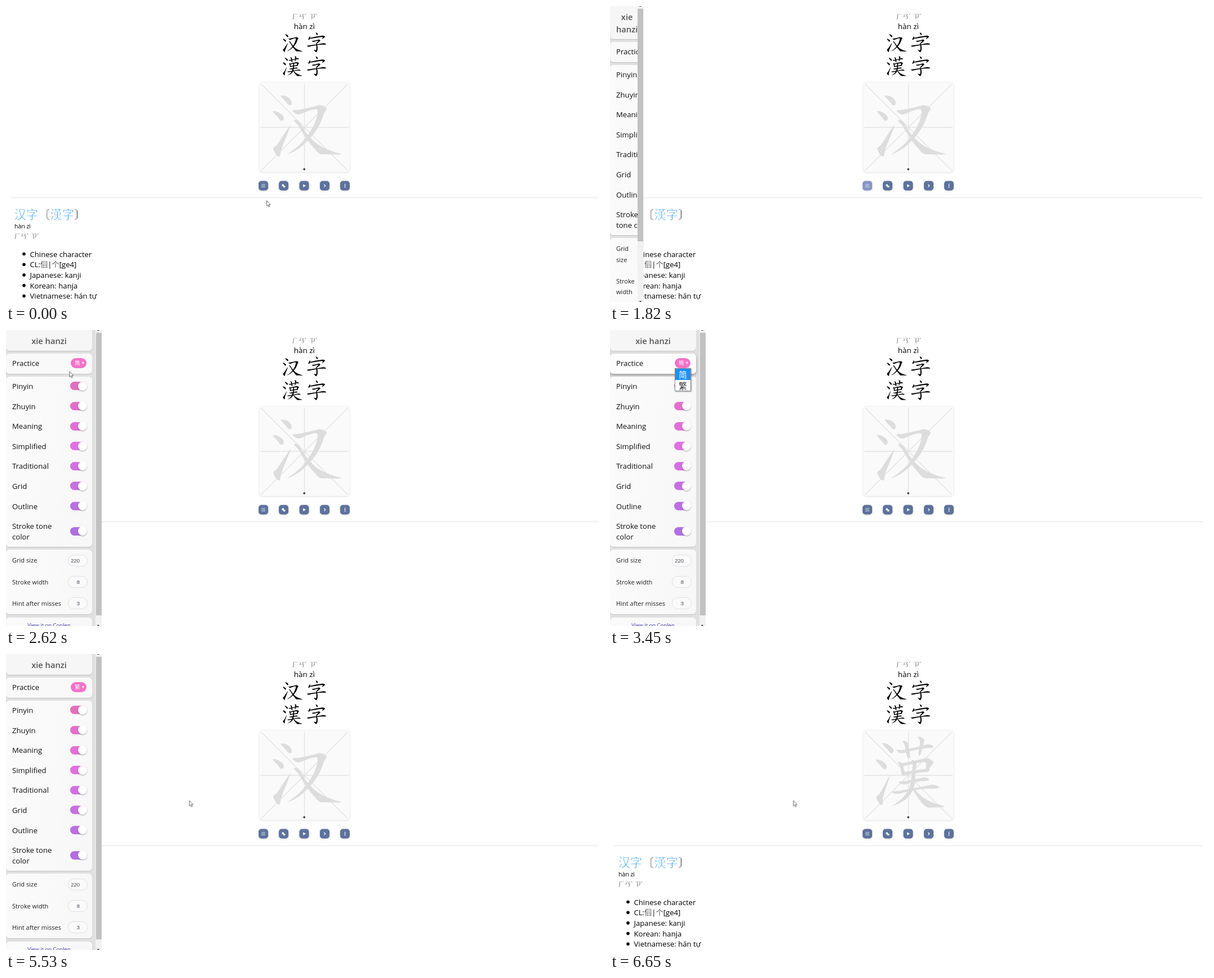
Recreate the animation shown at these times as an HTML page. Size 1063 by 527 pixels, loop 8 s.

```html
<!DOCTYPE html>
<html lang="zh">
<head>
<meta charset="utf-8">
<title>xie hanzi</title>
<style>
html, body { margin: 0; width: 100%; height: 100%; overflow: hidden; background: #fff; }
body { position: relative; font: 13.15px/18.7px "Open Sans", "Noto Sans", "Noto Sans CJK SC", sans-serif; color: #111; }
svg { position: absolute; left: 0; top: 0; display: block; }
.zhuyin { font: 11px "Noto Sans", "Noto Sans CJK TC", sans-serif; }
.entry { font: 21.3px "Noto Sans CJK SC", sans-serif; }
/* a white outline thins the strokes */
.thin { stroke: #fff; stroke-width: .35px; }
.entry.thin { stroke-width: .8px; }

.simplified, .traditional, .press, .popup, .option, .pick, .cursor, .cursor path, .thumb, .sidebar, .practice {
  animation: 8s step-end infinite;
}

/* writing pad and toolbar */
.simplified { animation-name: first-glyph; }
.traditional { animation-name: second-glyph; }
.press { animation-name: press; }
@keyframes first-glyph { 0% { opacity: 1 } 83.125%, to { opacity: 0 } }
@keyframes second-glyph { 0% { opacity: 0 } 83.125%, to { opacity: 1 } }
@keyframes press {
  0% { fill: #5d729c } 15% { fill: #7183b2 } 18.625% { fill: #8796c4 }
  26.5%, to { fill: #5d729c }
}

/* sidebar */
.sidebar {
  position: absolute; left: 0; top: 0; width: 0; height: 527px; overflow: hidden;
  background: #e0e0e0; animation-name: slide; animation-timing-function: ease;
}
@keyframes slide {
  0%, 21.36% { width: 0 }
  27.61%, 70.025% { width: 170px }
  76.28%, to { width: 0 }
}
.view { position: absolute; left: 0; right: 11px; top: 0; bottom: 0; overflow: hidden; }
.content { width: calc(100% - 6px); min-width: 60px; }
.panel {
  box-sizing: border-box; min-width: min-content; margin-bottom: 5px; padding: 0 10px 0 11px; border-radius: 6px;
  background: linear-gradient(100deg, #fbfbfb, #f7f7f7); box-shadow: 0 1px 1px #0002;
}
.title {
  padding: 7.5px 11px; border-radius: 0 0 6px 6px; text-align: center; background: #f6f6f6;
  font-size: 14.7px; font-weight: 600; line-height: 22px; color: #555;
}
.practice { display: flex; justify-content: space-between; align-items: center; height: 35.6px; animation-name: raise; animation-timing-function: ease; }
@keyframes raise {
  0%, 41.25% { background: #f9f9f9; box-shadow: 0 1px 1px #0002 }
  45.5%, 66.625% { background: #fff; box-shadow: 0 3px 7px #0006 }
  69.125%, to { background: #f9f9f9; box-shadow: 0 1px 1px #0002 }
}
.select {
  position: relative; flex: none; width: 28px; height: 18px; margin: -2px 0 0 12px; border-radius: 9px;
  background: #f373c9; color: #fff; font: 9.5px/18px "Noto Sans CJK SC", sans-serif;
}
.select::after {
  content: ""; position: absolute; left: 19.5px; top: 7.5px;
  border: 2.3px solid transparent; border-top: 4px solid #fff; border-bottom: 0;
}
.pick { position: absolute; left: 7px; top: -.5px; }
.before { animation-name: before; }
.after { animation-name: after; }
@keyframes before { 0% { opacity: 1 } 58%, to { opacity: 0 } }
@keyframes after { 0% { opacity: 0 } 58%, to { opacity: 1 } }

.toggles, .numbers { display: grid; grid-template-columns: 1fr auto; align-items: center; }
.toggles { column-gap: 12px; }
.toggles span { padding: 8.45px 0; }
.toggles i {
  position: relative; width: 29px; height: 15px; margin-top: -1px; border-radius: 8px;
  background: hsl(calc(319 - var(--i) * 6.5) 66% 66%);
}
.toggles i::after {
  content: ""; position: absolute; right: -.5px; top: -.5px; width: 16px; height: 16px;
  border-radius: 50%; background: #fff; box-shadow: 0 1px 2px #0005;
}
.numbers { column-gap: 7px; padding-right: 8px; font-size: 11.05px; line-height: 19.2px; color: #222; }
.numbers span { padding: 9.5px 0; }
.numbers b {
  box-sizing: border-box; width: 35px; height: 21px; padding-right: 13px; border: 1px solid #e0e0e4; border-radius: 10px;
  background: #fafafa; text-align: right; font: 9.5px/19px "Liberation Sans", Arial, sans-serif; color: #445;
}
.link { height: 60px; margin-top: 6px; padding: 5px 0; text-align: center; white-space: nowrap; font-size: 9.5px; color: #3a35a5; }
.bar { position: absolute; right: 0; top: 0; width: 11px; height: 100%; background: #f1f1f1; }
.bar::before, .bar::after {
  content: ""; position: absolute; left: 3px; border: 2.5px solid transparent;
}
.bar::before { top: -3px; border-bottom: 4px solid #555; border-top: 0; }
.bar::after { bottom: -2px; border-top: 4px solid #555; border-bottom: 0; }
.thumb { position: absolute; left: .5px; top: 5px; width: 10px; height: 414px; background: #c1c1c1; animation-name: thumb; }
@keyframes thumb {
  0% { height: 414px } 23.2% { height: 422px } 24.8% { height: 503px }
  71% { height: 422px } 72.8%, to { height: 414px }
}

/* drop-down list */
.popup {
  position: absolute; left: 115px; top: 68px; box-sizing: border-box; width: 29px; height: 41px;
  border: 1px solid #8a8a8a; background: #fff; box-shadow: 1px 1px 2px #0005; animation-name: popup;
}
.option { height: 19.5px; text-align: center; font: 14.5px/19px "Noto Sans CJK SC", sans-serif; }
.option:first-child { animation-name: leave; }
.option:last-child { animation-name: enter; }
@keyframes popup { 0% { visibility: hidden } 41.25% { visibility: visible } 58%, to { visibility: hidden } }
@keyframes leave { 0% { background: #1e90ff; color: #fff } 50.5%, to { background: #fff; color: #333 } }
@keyframes enter { 0% { background: #fff; color: #333 } 50.5%, to { background: #1e90ff; color: #fff } }

/* pointer */
.cursor { animation-name: move; animation-timing-function: ease-in-out; }
.cursor path { animation-name: show; }
@keyframes move {
  0%, 9.125% { transform: translate(463px, 346px) }
  12.5% { transform: translate(441px, 333px) }
  16.125% { transform: translate(454px, 317px); animation-timing-function: step-end }
  29.375%, 31.25% { transform: translate(54px, 101px) }
  32.75% { transform: translate(112.5px, 73.5px) }
  38% { transform: translate(127px, 63px) }
  48.75% { transform: translate(128px, 66px) }
  52.25%, 58% { transform: translate(130px, 97px) }
  63.125%, to { transform: translate(325.5px, 260.5px) }
}
@keyframes show {
  0% { opacity: 1 } 15% { opacity: 0 } 29.375% { opacity: 1 }
  38% { opacity: 0 } 48.75%, to { opacity: 1 }
}
</style>
</head>
<body>
<svg width="1063" height="527">
  <defs>
    <filter id="soft" x="-20%" y="-20%" width="140%" height="140%"><feDropShadow dx="0" dy=".5" stdDeviation="1.5" flood-opacity=".2"/></filter>
    <g id="han-simple">
      <path d="M488 160C495 158 507 163 508 172C509 177 504 178 501 175C497 169 492 166 488 160Z
        M474 187C482 186 493 193 494 199C494 205 489 206 486 202C483 196 477 193 474 187Z
        M506 211C503 224 492 246 489 257C487 264 488 268 485 268C481 268 476 258 475 254C476 250 480 250 482 247C489 236 498 222 506 211Z"/>
      <path d="M509 187C512 184 516 186 520 185C534 182 548 179 555 177C560 175 570 180 570 183C570 186 566 188 565 192C560 209 552 222 541 235C529 248 515 260 499 264C511 257 525 246 535 232C546 217 553 202 554 188C554 184 552 183 548 184C540 185 530 190 522 193C517 194 512 190 509 187Z"/>
      <path d="M512 203C518 201 523 208 526 214C535 229 548 244 562 251C572 256 586 261 596 263C596 266 580 264 562 264C557 264 554 261 550 256C538 243 528 228 520 213C517 209 513 207 512 203Z"/>
    </g>
    <g id="han-full">
      <path d="M484 158C492 158 502 165 504 171C505 176 500 179 497 175C493 168 487 165 484 158Z
        M472 188C480 187 491 193 492 200C492 206 487 207 484 203C481 197 475 194 472 188Z
        M498 215C495 228 487 246 485 257C485 264 486 270 482 269C478 267 474 259 473 255C475 252 479 250 481 246C487 236 492 224 498 215Z"/>
      <path d="M509 171C512 169 517 172 521 171C537 168 553 164 563 161C568 160 576 163 575 166C573 168 566 167 560 168C546 170 532 173 523 176C517 178 511 175 509 171Z"/>
      <path d="M520 155C525 154 530 158 531 162C531 169 533 176 534 182C534 186 530 187 528 183C526 177 525 168 524 163C523 159 521 158 520 155Z"/>
      <path d="M547 147C553 147 560 151 559 155C557 159 556 168 553 176C552 181 549 183 548 179C549 172 551 163 551 157C551 152 548 150 547 147Z"/>
      <path d="M511 192C516 191 520 194 521 199C522 205 524 210 524 214C523 218 519 217 518 213C517 206 516 200 514 197Z"/>
      <path d="M518 195C532 192 550 188 559 186C565 184 576 190 575 194C573 197 570 200 568 204C566 209 562 211 561 207C561 202 563 197 562 194C560 191 553 193 547 194C537 196 527 198 520 200Z"/>
      <path d="M520 211C533 208 550 206 566 204C570 205 568 209 564 210C550 211 534 214 521 216Z"/>
      <path d="M513 228C516 226 521 227 525 226C537 224 549 222 556 220C561 219 568 222 567 224C563 227 555 226 548 227C540 228 532 230 526 232C520 233 515 231 513 228Z"/>
      <path d="M501 246C505 243 512 245 518 243C534 240 556 236 570 233C576 232 586 235 585 238C581 241 570 239 560 240C545 241 528 245 517 248C510 250 504 249 501 246Z"/>
      <path d="M536 189C540 188 546 192 545 196C542 208 544 225 540 238C535 254 520 266 500 271C513 264 527 252 532 238C537 224 537 208 538 198Z"/>
      <path d="M541 240C550 252 562 260 575 265C583 268 590 269 595 271C594 274 582 272 568 274C562 273 556 268 552 262C547 256 543 249 539 243Z"/>
    </g>
    <g id="zi">
      <path d="M54 0C62 2 68 8 67 14C64 18 60 15 58 11Z"/>
      <path d="M17 24C22 26 22 32 19 40C16 47 9 48 9 42C11 36 16 30 17 24Z"/>
      <path d="M20 34C45 27 75 23 96 20C104 19 113 24 111 28C106 33 100 37 93 43C95 37 98 32 97 29C90 27 60 33 20 39Z"/>
      <path d="M32 53C45 51 62 47 72 44C79 43 84 48 82 52C76 57 69 64 60 71L56 68C62 62 68 56 70 52C62 51 50 56 40 59C35 59 32 56 32 53Z"/>
      <path d="M54 66C63 72 67 84 66 98C66 108 63 118 57 122C51 118 46 113 42 106C48 108 54 111 57 108C60 100 59 82 54 66Z"/>
      <path d="M0 82C10 80 30 77 60 73C80 70 92 67 102 66C110 66 119 70 118 74C112 77 100 74 90 75C65 77 35 82 15 87C8 89 2 86 0 82Z"/>
    </g>
    <rect id="key" y="311.5" width="17" height="17" rx="5"/>
  </defs>

  <g class="zhuyin thin"><text x="509" y="22.5">ㄏㄢˋ</text><text x="539" y="22.5">ㄗˋ</text></g>
  <text x="530.3" y="41" text-anchor="middle" font-size="13.4">hàn zì</text>
  <g role="img" aria-label="汉字 漢字">
    <use href="#han-simple" transform="translate(354.5 4.2) scale(.29)"/>
    <use href="#zi" transform="translate(534.8 47) scale(.29)"/>
    <use href="#han-full" transform="translate(359.8 48) scale(.28)"/>
    <use href="#zi" transform="translate(534.8 89.5) scale(.29)"/>
  </g>

  <rect x="450.5" y="136.5" width="160" height="159" rx="5" fill="#fafafa" filter="url(#soft)"/>
  <path d="M453 138.5L608 293.5M608 138.5L453 293.5M530.5 138V294M452 216H609" fill="none" stroke="#e3e3e3" stroke-width="1.3"/>
  <g fill="#ddd">
    <use class="simplified" href="#han-simple"/>
    <use class="traditional" href="#han-full"/>
  </g>
  <circle cx="530.2" cy="290.6" r="1.9" fill="#444"/>

  <g fill="#5d729c" filter="url(#soft)">
    <use class="press" href="#key" x="449"/><use href="#key" x="485"/><use href="#key" x="521.5"/>
    <use href="#key" x="558"/><use href="#key" x="594"/>
  </g>
  <path d="M454 317.7H461M454 320H461M454 322.3H461" stroke="#d5dcec" stroke-width=".9"/>
  <path d="M490.5 317.5H494V321H490.5ZM494 319.5L497 320.5L495.5 323.5L492.5 322.5Z" fill="#fff"/>
  <path d="M528.2 317.2L533 320L528.2 322.8Z" fill="#fff"/>
  <path d="M565.4 317.7L567.7 320L565.4 322.3" fill="none" stroke="#fff" stroke-width="1.2"/>
  <g fill="#fff"><circle cx="602.6" cy="317.4" r=".95"/><circle cx="602.6" cy="320" r=".95"/><circle cx="602.6" cy="322.6" r=".95"/></g>

  <path d="M8 341.5H1054" stroke="#e4e4e4"/>
  <text class="entry thin" x="14.5" y="378.5"><tspan fill="#2196f3">汉字</tspan>〔<tspan fill="#2196f3">漢字</tspan>〕</text>
  <text x="15" y="396" font-size="10.5">hàn zì</text>
  <g class="zhuyin thin"><text x="15" y="413.5">ㄏㄢˋ</text><text x="44" y="413.5">ㄗˋ</text></g>
  <g><circle cx="32" cy="441.5" r="2.8"/><circle cx="32" cy="460.2" r="2.8"/><circle cx="32" cy="478.9" r="2.8"/><circle cx="32" cy="497.6" r="2.8"/><circle cx="32" cy="516.3" r="2.8"/></g>
  <text x="42.5" y="446.5">Chinese character</text>
  <text x="42.5" y="465.2">CL:<tspan class="thin">個</tspan>|<tspan class="thin">个</tspan>[ge4]</text>
  <text x="42.5" y="483.9">Japanese: kanji</text>
  <text x="42.5" y="502.6">Korean: hanja</text>
  <text x="42.5" y="521.3">Vietnamese: hán tự</text>
</svg>

<div class="sidebar">
  <div class="view"><div class="content">
    <div class="panel title">xie hanzi</div>
    <div class="panel practice">Practice<div class="select"><span class="pick before">简</span><span class="pick after">繁</span></div></div>
    <div class="panel toggles">
      <span>Pinyin</span><i style="--i:0"></i>
      <span>Zhuyin</span><i style="--i:1"></i>
      <span>Meaning</span><i style="--i:2"></i>
      <span>Simplified</span><i style="--i:3"></i>
      <span>Traditional</span><i style="--i:4"></i>
      <span>Grid</span><i style="--i:5"></i>
      <span>Outline</span><i style="--i:6"></i>
      <span>Stroke tone color</span><i style="--i:7"></i>
    </div>
    <div class="panel numbers">
      <span>Grid size</span><b>220</b>
      <span>Stroke width</span><b>8</b>
      <span>Hint after misses</span><b>3</b>
    </div>
    <div class="panel link">View it on Coplen</div>
  </div></div>
  <div class="bar"><div class="thumb"></div></div>
</div>

<div class="popup"><div class="option">简</div><div class="option">繁</div></div>

<svg width="1063" height="527">
  <g class="cursor"><path d="M.5 .5V10.2L2.7 8.2L4.2 11.7L5.7 11L4.2 7.6H7.2Z" fill="#fff" stroke="#444" stroke-width=".8"/></g>
</svg>
</body>
</html>
```
